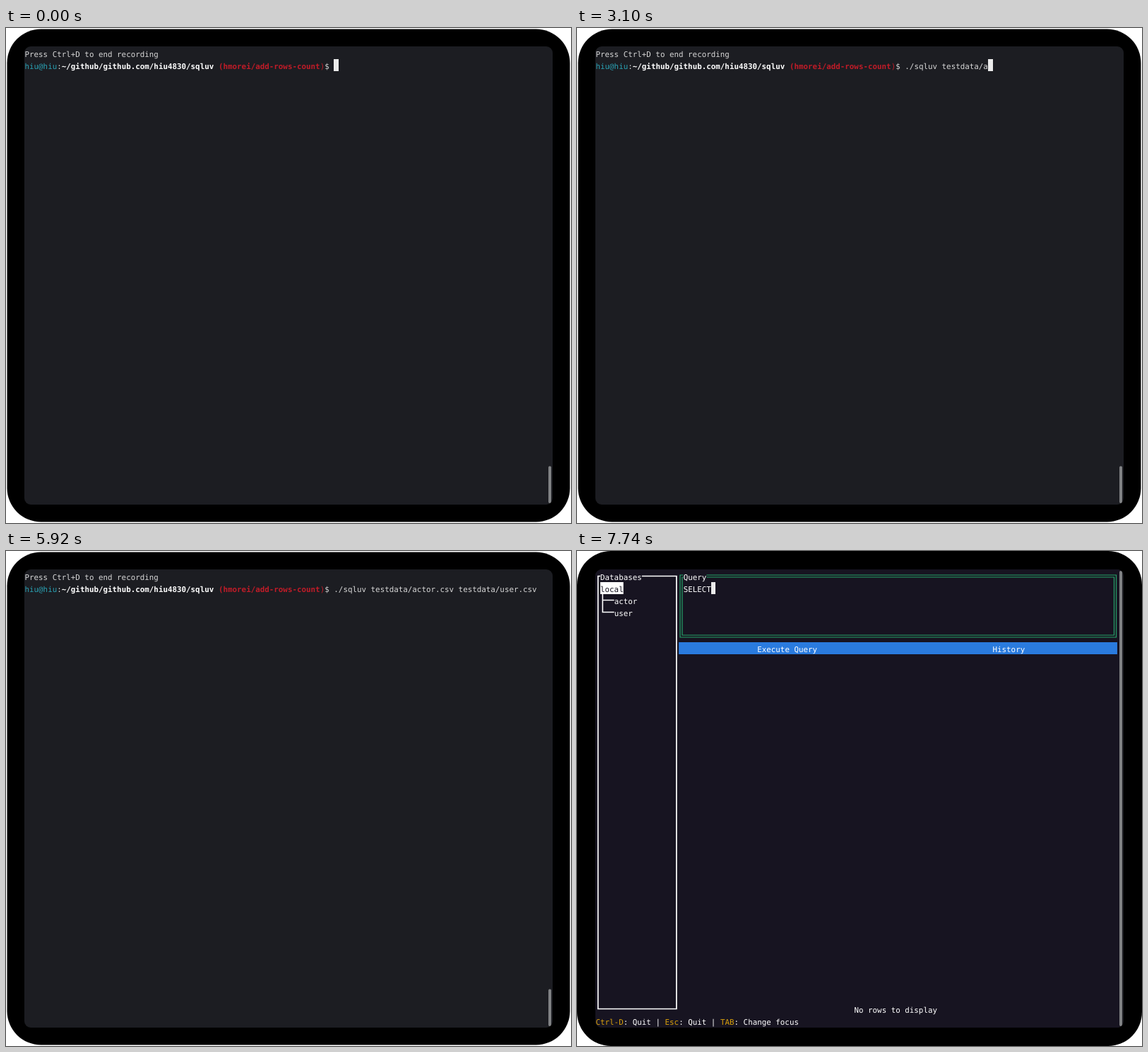
An HTML page with a canvas for the animation above (7.99 s loop, 800 px wide and 700 px high).

```html
<!DOCTYPE html>
<html lang="en">
<head>
<meta charset="utf-8">
<title>Terminal session</title>
<style>
  html, body { margin: 0; width: 800px; height: 700px; overflow: hidden; background: #fff; }
  canvas { display: block; }
</style>
</head>
<body>
<canvas id="stage" width="800" height="700"></canvas>
<script>
const ctx = document.getElementById('stage').getContext('2d');
const LOOP = 7990, TUI_START = 6170;
const X0 = 26.5, Y0 = 27, CW = 6.535, RH = 17;
const FONT = '10.855px "DejaVu Sans Mono", monospace';
const C = {
  shell: '#1c1d22', dark: '#171421', text: '#d6d6d6', white: '#ffffff', cursor: '#ebebeb',
  teal: '#2aa1b3', red: '#c01c28', green: '#26a269', blue: '#2a7bde', yellow: '#d9a00c', bar: '#808284'
};
const COMMAND = './sqluv testdata/actor.csv testdata/user.csv ';
const QUERY = 'SELECT';

// [start ms, characters typed, cursor visible]
const SHELL_STEPS = [
  [0, 0, 1], [250, 0, 0], [530, 0, 1], [780, 0, 0], [1040, 0, 1],
  [1290, 1, 1], [1540, 3, 1], [1810, 4, 1], [2070, 8, 1], [2320, 9, 1],
  [2580, 11, 1], [2840, 17, 1], [3100, 18, 1], [3360, 19, 1], [3610, 20, 1],
  [3870, 27, 1], [4130, 28, 1], [4380, 29, 1], [4640, 36, 1], [4900, 37, 1],
  [5160, 38, 1], [5410, 45, 1], [5670, 45, 0]
];
const QUERY_STEPS = [
  [6170, 0, 1], [6430, 0, 0], [6680, 0, 1], [6950, 1, 1],
  [7220, 2, 1], [7480, 4, 1], [7740, 6, 1]
];

const colX = c => X0 + c * CW;
const rowY = r => Y0 + r * RH;
const midX = c => colX(c + 0.5);
const midY = r => rowY(r + 0.5);
const stepAt = (steps, t) => steps.filter(s => s[0] <= t).pop();

function text(str, col, row, color, bold) {
  ctx.font = (bold ? 'bold ' : '') + FONT;
  ctx.fillStyle = color;
  ctx.fillText(str, colX(col), rowY(row) + 13.5);
}

// Writes [text, color, bold] runs one after another.
function runs(list, col, row) {
  for (const [str, color, bold] of list) {
    text(str, col, row, color, bold);
    col += str.length;
  }
  return col;
}

function cells(col, row, count, color) {
  ctx.fillStyle = color;
  ctx.fillRect(colX(col), rowY(row), count * CW, RH);
}

function cursor(col, row, color = C.cursor) {
  const x = Math.round(colX(col));
  ctx.fillStyle = color;
  ctx.fillRect(x, rowY(row), Math.round(colX(col + 1)) - x, RH);
}

function round(x, y, w, h, r, color) {
  ctx.beginPath();
  ctx.roundRect(x, y, w, h, r);
  ctx.fillStyle = color;
  ctx.fill();
}

function line(color, width, ...pts) {
  ctx.beginPath();
  pts.forEach(([x, y]) => ctx.lineTo(x, y));
  ctx.strokeStyle = color;
  ctx.lineWidth = width;
  ctx.stroke();
}

// Box outline whose top edge leaves room for a title.
function box(l, t, r, b, titleStart, titleEnd, color, width) {
  line(color, width, [titleStart, t], [l, t], [l, b], [r, b], [r, t], [titleEnd, t]);
}

function drawShell(t) {
  const [, typed, shown] = stepAt(SHELL_STEPS, t);
  text('Press Ctrl+D to end recording', 0, 0, C.text);
  const col = runs([
    ['hiu@hiu', C.teal],
    [':', C.text],
    ['~/github/github.com/hiu4830/sqluv ', C.white, true],
    ['(hmorei/add-rows-count', C.red, true],
    [')', C.red],
    ['$ ', C.text]
  ], 0, 1);
  text(COMMAND.slice(0, typed), col, 1, C.text);
  if (shown) cursor(col + typed, 1);
  round(768, 619.5, 4, 52.5, 2, C.bar);
}

function drawSidebar() {
  box(midX(0), midY(0), midX(17), midY(36), colX(1), colX(10), C.white, 1.7);
  text('Databases', 1, 0, C.white);
  cells(1, 1, 5, C.white);
  text('local', 1, 1, C.dark);
  const x = midX(1);
  line(C.white, 1.6, [x, rowY(2)], [x, midY(3)], [colX(4), midY(3)]);
  line(C.white, 1.6, [x, midY(2)], [colX(4), midY(2)]);
  text('actor', 4, 2, C.white);
  text('user', 4, 3, C.white);
}

function drawQuery(t) {
  const [, typed, shown] = stepAt(QUERY_STEPS, t);
  for (const d of [-1.5, 1.5]) {
    box(147.5 + d, 35.5 + d, 762 - d, 120.5 - d, colX(19), colX(24), C.green, 1.2);
  }
  text('Query', 19, 0, C.white);
  if (typed) {
    text(QUERY.slice(0, typed), 19, 1, C.white);
    cursor(19 + typed, 1);
  } else {
    text('Enter SQL query here...', 19, 1, C.green);
    if (shown) {
      cursor(19, 1, C.green);
      text('E', 19, 1, C.dark);
    }
  }
}

function drawTui(t) {
  ctx.fillStyle = C.dark;
  ctx.fillRect(26, 26, 745.5, 648);
  drawSidebar();
  drawQuery(t);
  cells(18, 6, 95, C.blue);
  text('Execute Query', 35, 6, C.white);
  text('History', 86, 6, C.white);
  text('No rows to display', 56, 36, C.white);
  runs([
    ['Ctrl-D', C.yellow], [': Quit | ', C.white],
    ['Esc', C.yellow], [': Quit | ', C.white],
    ['TAB', C.yellow], [': Change focus', C.white]
  ], 0, 37);
  round(768, 28, 4, 644, 2, C.bar);
}

function draw(t) {
  const tui = t >= TUI_START;
  const inset = tui ? 0 : 1.5;
  ctx.fillStyle = '#fff';
  ctx.fillRect(0, 0, 800, 700);
  round(inset, inset, 800 - 2 * inset, 700 - 2 * inset, 48, '#000');
  ctx.save();
  round(26, 26, 748, 648, 9, C.shell);
  ctx.clip();
  if (tui) drawTui(t); else drawShell(t);
  ctx.restore();
}

ctx.textRendering = 'geometricPrecision';
const start = performance.now();
function tick() {
  draw((performance.now() - start) % LOOP);
  requestAnimationFrame(tick);
}
tick();
</script>
</body>
</html>
```
